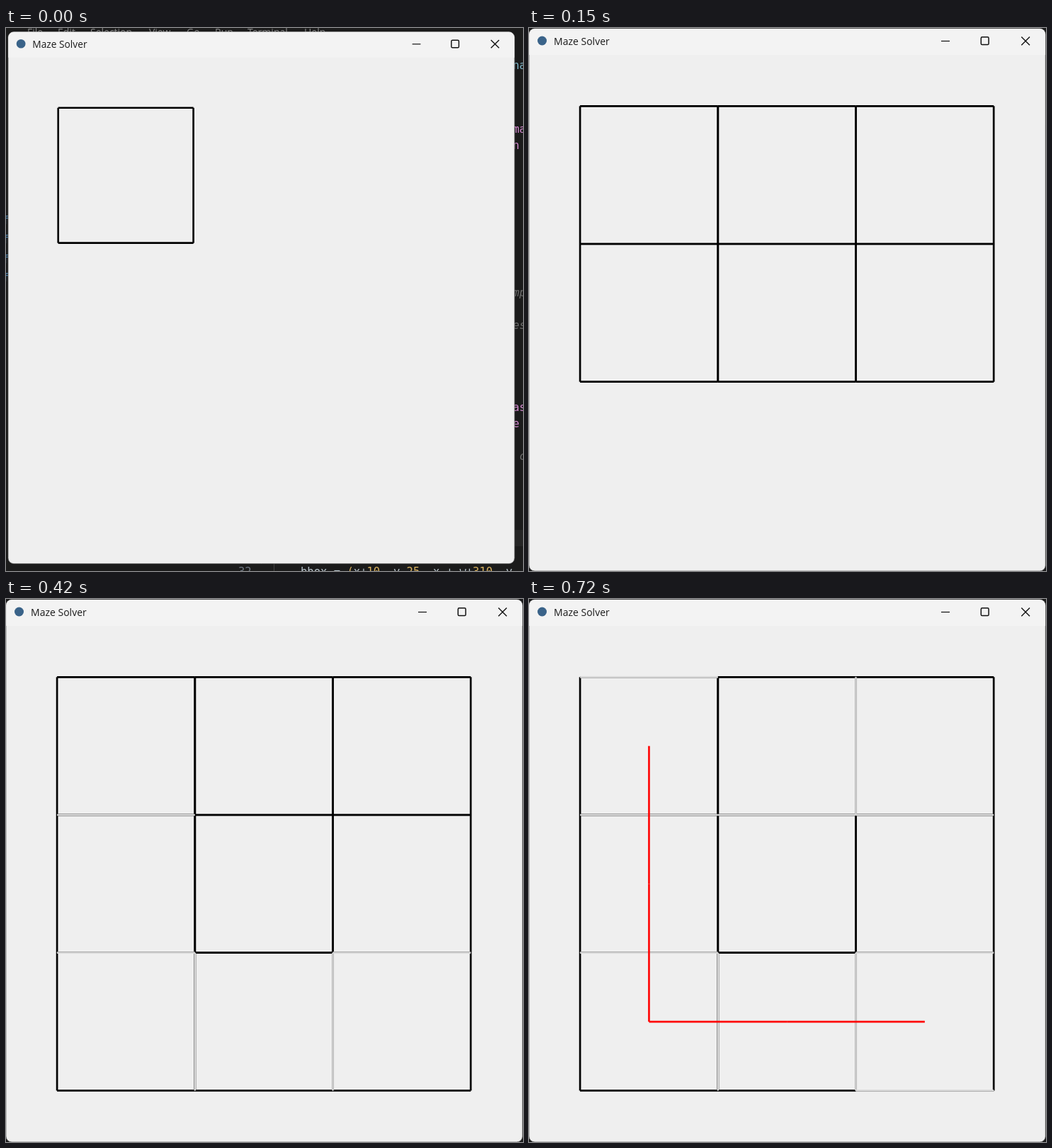
An HTML page with a canvas that plays this animation: 730 px wide and 767 px high, repeating every 0.75 s.

```html
<!DOCTYPE html>
<html lang="en">
<head>
<meta charset="utf-8">
<title>Maze Solver</title>
<style>
  html, body { margin: 0; width: 100%; height: 100%; overflow: hidden; background: #1b1b1b; }
  canvas { display: block; }
</style>
</head>
<body>
<canvas id="stage" width="730" height="767"></canvas>
<script>
const W = 730, H = 767, LOOP = 750, TICK = 30;
const ctx = document.getElementById('stage').getContext('2d');
const mono = '15.5px "DejaVu Sans Mono", monospace';
const sans = '14px "Open Sans", sans-serif';

const left = 72.1, top0 = 110.3, size = 194.7;
const WALL = '#000', GONE = '#d9d9d9', TRAIL = '#ff0808';

// Order in which the cells are visited, as [column, row]
const visits = [[0,0], [0,1], [0,2], [1,2], [2,2], [2,1], [2,0], [1,0], [1,1]];
const route = [[0,0], [0,1], [0,2], [1,2], [2,2]];

function line(x1, y1, x2, y2, color, width) {
  ctx.strokeStyle = color;
  ctx.lineWidth = width;
  ctx.beginPath();
  ctx.moveTo(x1, y1);
  ctx.lineTo(x2, y2);
  ctx.stroke();
}

function text(str, x, y, color, font) {
  ctx.font = font;
  ctx.fillStyle = color;
  ctx.fillText(str, x, y);
}

// Line between two points given in cell units
function gridLine(c1, r1, c2, r2, color) {
  line(left + c1 * size, top0 + r1 * size, left + c2 * size, top0 + r2 * size, color, 2.7);
}

function cell(c, r) {
  gridLine(c, r, c, r + 1, WALL);
  gridLine(c + 1, r, c + 1, r + 1, WALL);
  gridLine(c, r, c + 1, r, WALL);
  gridLine(c, r + 1, c + 1, r + 1, WALL);
}

function openWall([c1, r1], [c2, r2]) {
  const c = Math.max(c1, c2), r = Math.max(r1, r2);
  if (c1 === c2) gridLine(c, r, c + 1, r, GONE);
  else gridLine(c, r, c, r + 1, GONE);
}

const steps = [];
for (let i = 0; i < 9; i++) {
  steps.push([i * TICK, () => cell(i % 3, Math.floor(i / 3))]);
}
for (let i = 0; i < 8; i++) {
  steps.push([300 + i * TICK, () => openWall(visits[i], visits[i + 1])]);
}
steps.push([540, () => gridLine(0, 0, 1, 0, GONE)]);
steps.push([570, () => gridLine(2, 3, 3, 3, GONE)]);
for (let i = 0; i < 4; i++) {
  const [a, b] = [route[i], route[i + 1]];
  steps.push([630 + i * TICK, () =>
    gridLine(a[0] + .5, a[1] + .5, b[0] + .5, b[1] + .5, TRAIL)]);
}

function editor() {
  const menu = [['File', 30], ['Edit', 73], ['Selection', 119], ['View', 202],
    ['Go', 255], ['Run', 295], ['Terminal', 341], ['Help', 421]];
  for (const [word, x] of menu) text(word, x, 11, '#8a8a8a', sans);

  ctx.fillStyle = '#252525';
  ctx.fillRect(716, 709, 14, 23);

  const pink = '#d48bd0', gray = '#6b6b6b', blue = '#4b86b4';
  const right = [['na', 58, '#7fb8cc'], ['ma', 148, pink], ['n', 171, pink],
    ['mp', 379, gray], ['es', 425, gray], ['as', 541, pink], ['e', 564, pink], [' c', 610, gray]];
  for (const [s, y, color] of right) {
    text(s, 715.5, y, color, (color === gray ? 'italic ' : '') + mono);
  }
  for (const y of [277, 304, 332, 358]) text('f', -5, y, blue, mono);

  line(378.5, 756, 378.5, H, '#404040', 1);
  text('32', 328, 772.5, '#6e7681', mono);
  const code = 'bbox = (x+10, y-25, x + w+310, y';
  [...code].forEach((ch, i) => {
    const color = /[\d(]/.test(ch) ? '#d9b25f' : '#b8c4cc';
    text(ch, 416 + i * 9.35, 772.5, color, mono);
  });
}

function frame() {
  ctx.beginPath();
  ctx.roundRect(0, .8, 729.3, 766.2, 8);
  ctx.fillStyle = '#efefef';
  ctx.fill();
  ctx.strokeStyle = '#555';
  ctx.lineWidth = .7;
  ctx.stroke();

  ctx.beginPath();
  ctx.roundRect(.2, 1, 728.9, 37, [8, 8, 0, 0]);
  ctx.fillStyle = '#f3f3f3';
  ctx.fill();

  ctx.beginPath();
  ctx.arc(18.5, 18, 6.5, 0, 7);
  ctx.fillStyle = '#3a6389';
  ctx.fill();
  text('Maze Solver', 35, 23.6, '#1a1a1a', sans);

  const ink = '#111';
  line(582, 18.5, 594, 18.5, ink, 1.2);
  ctx.lineWidth = 1.5;
  ctx.beginPath();
  ctx.roundRect(638.3, 12.8, 10.8, 10.8, 1.6);
  ctx.stroke();
  line(695.3, 12.6, 707, 24.2, ink, 1.4);
  line(707, 12.6, 695.3, 24.2, ink, 1.4);
}

function draw(t) {
  ctx.setTransform(1, 0, 0, 1, 0, 0);
  ctx.fillStyle = '#1b1b1b';
  ctx.fillRect(0, 0, W, H);
  // The window opens slightly smaller, over the editor
  if (t < TICK) {
    editor();
    ctx.setTransform(.9805, 0, 0, .9805, 3, 4.6);
  }
  frame();
  for (const [at, paint] of steps) if (at <= t) paint();
}

const start = performance.now();
function tick() {
  draw((performance.now() - start) % LOOP);
  requestAnimationFrame(tick);
}
tick();
</script>
</body>
</html>
```
